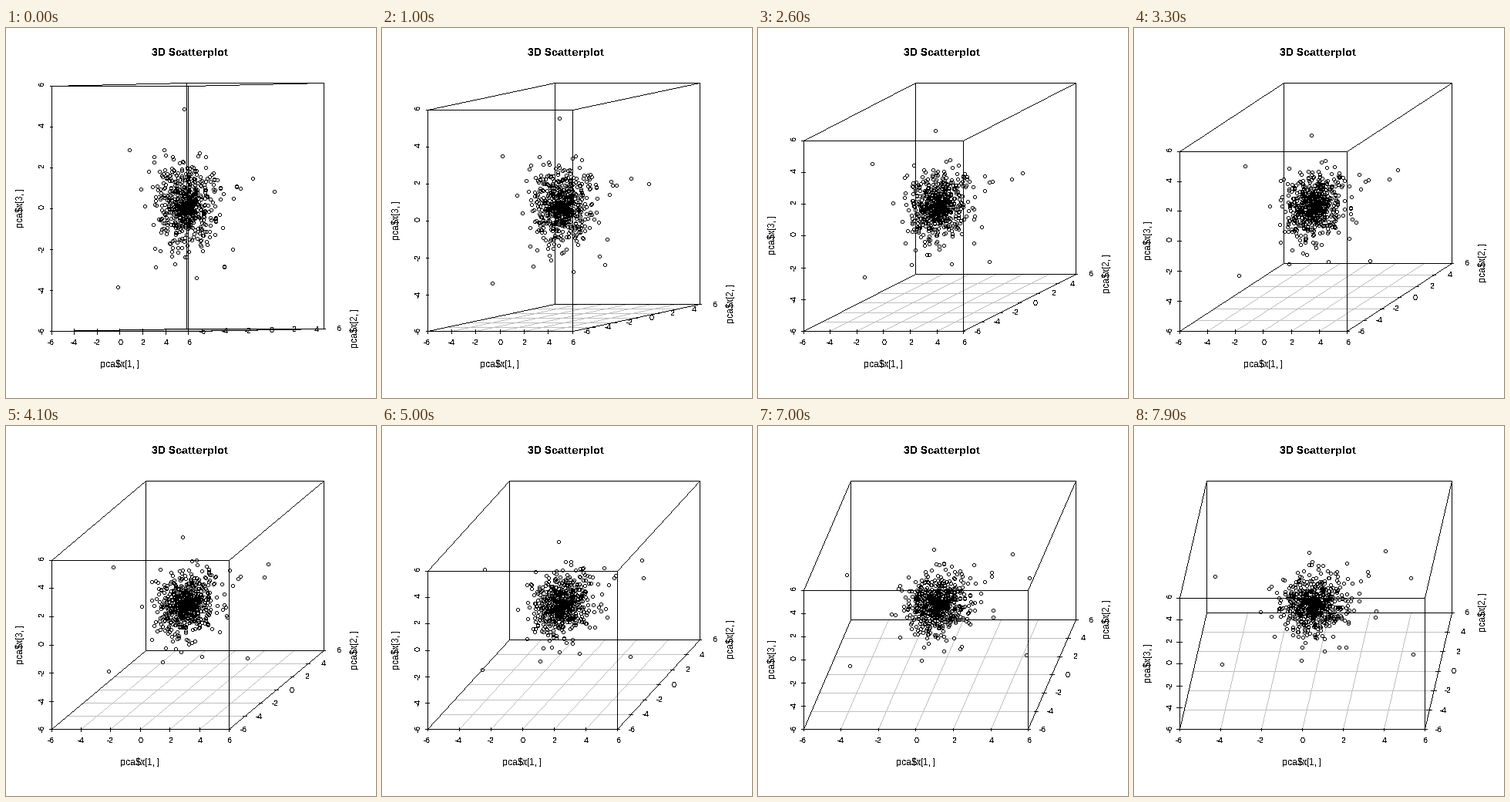
These frames come from a looping animation (480x480 px, 8000 ms). A matplotlib script:

```python
import itertools

import numpy as np
import matplotlib.pyplot as plt
from matplotlib.animation import FuncAnimation

plt.rcParams.update({
    "font.family": "Liberation Sans",
    "text.hinting": "native",
    "text.hinting_factor": 1,
    "text.antialiased": False,
    "text.parse_math": False,
})

SIZE, FRAMES, STEP = 480, 80, 100
LEFT, RIGHT, TOP, BASE = 59, 412.4, 71.2, 393.4
LO, HI = -6, 6
TICKS = np.arange(LO, HI + 1, 2)
BLACK, GREY = 0, 190


def make_cloud(seed=7):
    """Broad cloud, tight core, sparse shell and a few far points."""
    rng = np.random.default_rng(seed)
    bulk = rng.normal(size=(700, 3))
    bulk = bulk[np.linalg.norm(bulk, axis=1) < 2.7][:520]
    core = rng.normal(0, .25, (60, 3))
    shell = rng.normal(size=(30, 3))
    shell /= np.linalg.norm(shell, axis=1, keepdims=True)
    shell *= rng.uniform(2.7, 4, (30, 1))
    far = [(-4.4, -1.7, -3.9), (-4.9, -.2, 2.8), (2.9, 4.75, .7),
           (4.55, 1.2, 1.4), (5, -1.8, -2.9), (-.3, 0, 4.8)]
    return np.vstack([bulk * (.82, 1.05, 1.02) + (0, 0, .15),
                      core, shell * (.9, 1, 1), far])


points = make_cloud()

# Pixels of a small open circle
span = range(-2, 3)
ring = np.array([p for p in itertools.product(span, span)
                 if 4 <= p[0] ** 2 + p[1] ** 2 <= 5])

fig = plt.figure(figsize=(SIZE / 72, SIZE / 72), dpi=72, facecolor="white")
ax = fig.add_axes([0, 0, 1, 1])
# Lines and circles go on a pixel canvas, so they stay hard-edged
canvas = np.full((SIZE, SIZE), 255, np.uint8)
picture = ax.imshow(canvas, cmap="gray", vmin=0, vmax=255, aspect="auto",
                    extent=(0, SIZE, SIZE, 0), interpolation="nearest")
ax.set(xlim=(0, SIZE), ylim=(SIZE, 0))
ax.axis("off")


def add_text(s, x=0, y=0, size=10, ha="center", rot=0, **kw):
    return ax.text(x, y, s, fontsize=size, ha=ha, va="baseline", rotation=rot,
                   rotation_mode="anchor", color="black", **kw)


def tick_texts(**kw):
    return [add_text(f"{t:2d}", **kw) for t in TICKS]


add_text("3D Scatterplot", 238.5, 36, 14.4, weight="bold")
x_name = add_text("pca$x[1, ]", y=440, size=12)
y_name = add_text("pca$x[2, ]", x=456, size=12, rot=90)
z_name = add_text("pca$x[3, ]", x=22, size=12, rot=90)
x_nums = tick_texts(y=411)
y_nums = tick_texts(ha="left")
z_nums = tick_texts(x=50, rot=90)


def plot_pixels(xy, shade):
    x, y = xy.T
    canvas[y, x] = shade


def plot_line(a, b, shade=BLACK):
    n = np.abs(b - a).max()
    t = np.linspace(0, 1, n + 1)[:, None]
    plot_pixels(np.floor(a + (b - a) * t + .5).astype(int), shade)


def box_edges():
    corners = list(itertools.product((LO, HI), repeat=3))
    return [(a, b) for a, b in itertools.combinations(corners, 2)
            if sum(p != q for p, q in zip(a, b)) == 1]


def update(i):
    turn = (i + 1) / 90
    fx, fz = 1 - turn, turn
    w = (RIGHT - LEFT) / (1 + fx)
    h = (BASE - TOP) / (1 + fz)

    def project(p):
        x, y, z = (np.asarray(p).T - LO) / (HI - LO)
        px = LEFT + w * (x + fx * y)
        py = BASE - h * (z + fz * y)
        return np.stack([np.floor(px), np.floor(py + .5)], -1).astype(int)

    def line(a, b, shade=BLACK):
        plot_line(project(a), project(b), shade)

    canvas[:] = 255
    for t in TICKS:
        line((t, LO, LO), (t, HI, LO), GREY)
        line((LO, t, LO), (HI, t, LO), GREY)
    for a, b in box_edges():
        line(a, b)
    d = .12
    for t in TICKS:
        line((t, LO, LO - d), (t, LO, LO + d))
        line((HI - d, t, LO), (HI + d, t, LO))
        line((LO - d, LO, t), (LO + d, LO, t))
    dots = project(points)[:, None] + ring
    plot_pixels(dots.reshape(-1, 2), BLACK)
    picture.set_data(canvas)

    for tx, ty, tz, q in zip(x_nums, y_nums, z_nums, np.linspace(0, 1, 7)):
        tx.set_x(LEFT + w * q - .5)
        ty.set_position((LEFT + w * (1 + fx * q) + 14,
                         BASE - h * fz * q + 3.4))
        tz.set_y(BASE - h * q - .5)
    x_name.set_x(LEFT + w / 2 - .7)
    y_name.set_y(BASE - h * fz - .5)
    z_name.set_y(BASE - h / 2 - .5)
    return []


anim = FuncAnimation(fig, update, frames=FRAMES, interval=STEP,
                     repeat=True, repeat_delay=0, blit=False)
plt.show()
```
